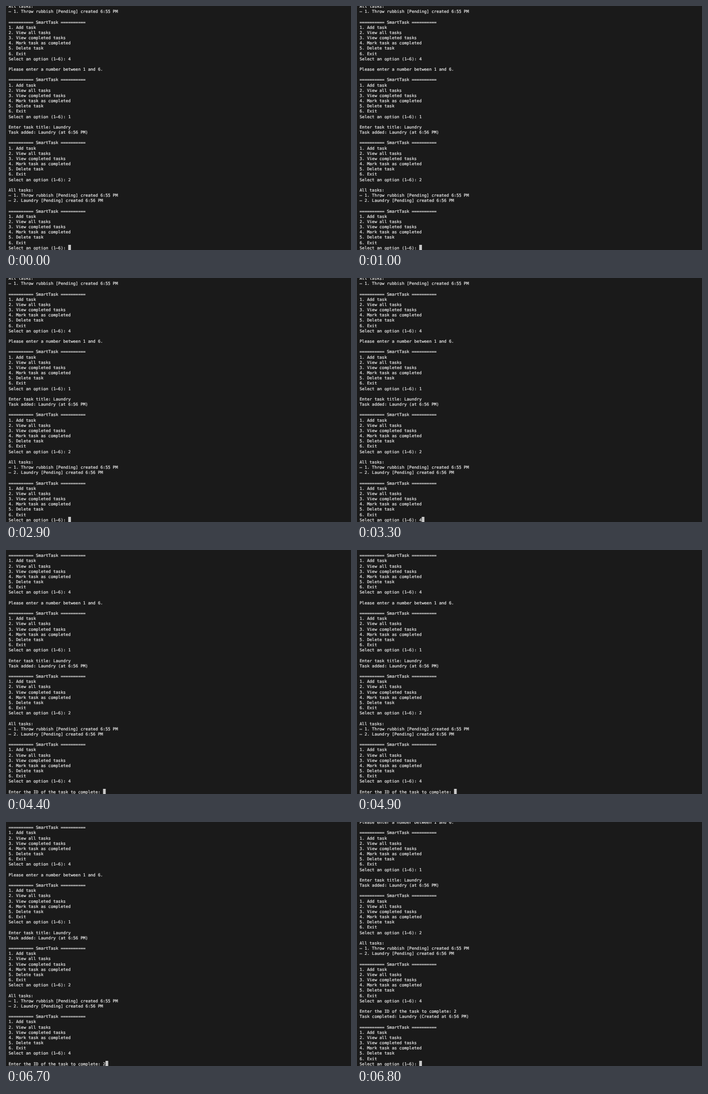
An HTML page that plays this animation: 600 by 426 pixels, repeating every 8 s.

```html
<!DOCTYPE html>
<html lang="en">
<head>
<meta charset="utf-8">
<title>Task terminal</title>
<style>
  html, body { margin: 0; width: 100%; height: 100%; overflow: hidden; background: #1a1a1a; }
  svg { display: block; width: 100%; height: 100%; }
  text {
    font: 7.18px "DejaVu Sans Mono", monospace;
    fill: #e6e6e6;
    stroke: #e6e6e6;
    stroke-width: 0.22px;
    white-space: pre;
    text-rendering: geometricPrecision;
  }
</style>
</head>
<body>
<svg viewBox="0 0 600 426">
  <rect width="600" height="426" fill="#1a1a1a"/>
  <g id="rows"></g>
  <rect id="cursor" y="417" width="4.7" height="9" fill="#c8c8c8"/>
</svg>
<script>
const LOOP = 8000;
const LEFT = 4.5, CHAR = 4.322, PITCH = 9.167, BASE = 424.75, ROWS = 47;

const RULE = "=".repeat(10);
const ASK = "Select an option (1–6): ";
const ASK_ID = "Enter the ID of the task to complete: ";
const menu = pick => [
  `${RULE} SmartTask ${RULE}`,
  "1. Add task",
  "2. View all tasks",
  "3. View completed tasks",
  "4. Mark task as completed",
  "5. Delete task",
  "6. Exit",
  ASK + pick
];
const RUBBISH = "– 1. Throw rubbish [Pending] created 6:55 PM";

const history = [
  "All tasks:", RUBBISH, "",
  ...menu(4), "",
  "Please enter a number between 1 and 6.", "",
  ...menu(1), "",
  "Enter task title: Laundry",
  "Task added: Laundry (at 6:56 PM)", "",
  ...menu(2), "",
  "All tasks:", RUBBISH,
  "– 2. Laundry [Pending] created 6:56 PM", ""
];
const chosen = [...history, ...menu(4), ""];

const steps = [
  [0, [...history, ...menu("")]],
  [3300, [...history, ...menu(4)]],
  [4400, [...chosen, ASK_ID]],
  [6100, [...chosen, ASK_ID + 2]],
  [6800, [...chosen, ASK_ID + 2,
    "Task completed: Laundry (Created at 6:56 PM)", "", ...menu("")]]
];

const group = document.getElementById("rows");
const cursor = document.getElementById("cursor");
const rows = Array.from({ length: ROWS }, (_, i) => {
  const row = document.createElementNS("http://www.w3.org/2000/svg", "text");
  row.setAttribute("x", LEFT);
  row.setAttribute("y", BASE - (ROWS - 1 - i) * PITCH);
  return group.appendChild(row);
});

let shown = null;
function draw(time) {
  const screen = steps.filter(([start]) => start <= time).pop()[1];
  if (screen === shown) return;
  shown = screen;
  const lines = screen.slice(-ROWS);
  rows.forEach((row, i) => { row.textContent = lines[i]; });
  cursor.setAttribute("x", LEFT + lines[ROWS - 1].length * CHAR);
}

const begin = performance.now();
function tick() {
  draw((performance.now() - begin) % LOOP);
  requestAnimationFrame(tick);
}
tick();
</script>
</body>
</html>
```
